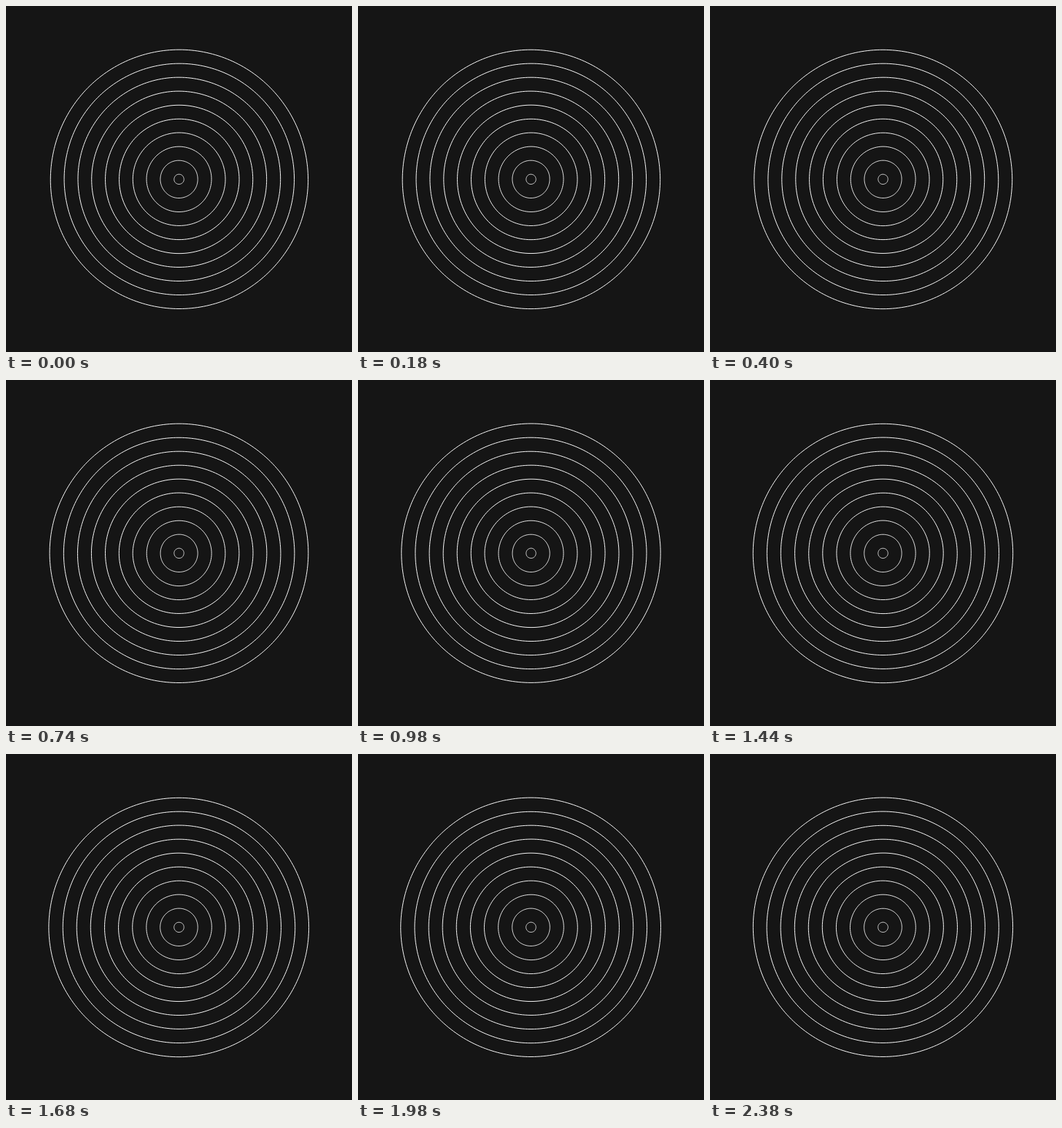
These frames come from a looping animation (500x500 px, 2400 ms). An HTML page with a canvas:

```html
<!DOCTYPE html>
<html lang="en">
<head>
<meta charset="utf-8">
<title>Rings</title>
<style>
  html, body { margin: 0; width: 100%; height: 100%; overflow: hidden; background: #151515; }
  canvas { display: block; }
</style>
</head>
<body>
<canvas id="stage" width="500" height="500"></canvas>
<script>
const ctx = document.getElementById('stage').getContext('2d');
const LOOP = 2400, STEP = 20;
const RINGS = 10, GAP = 20, INNER = 7.2;
const CENTER_X = 250, CENTER_Y = 250.35;
const TAU = Math.PI * 2;

// Slow sideways swelling that reaches the outer rings first.
function swell(ring, time) {
  const amount = 0.1 + 1.1 * ring / (RINGS - 1);
  const delay = (RINGS - 1 - ring) * 90;
  return -amount * (0.2 + Math.cos(Math.PI * (time + 150 - delay) / 2000));
}

// Small unevenness of the outline.
function wobble(ring, angle, time) {
  const size = 0.04 + 0.006 * ring;
  return size * (Math.sin(3 * angle + ring * 2.1 + time / 170) +
                 Math.sin(5 * angle - ring * 1.3 - time / 230));
}

function drawRing(ring, time) {
  const radius = INNER + ring * GAP;
  const growth = swell(ring, time);
  const points = 48 + ring * 24;
  ctx.beginPath();
  for (let k = 0; k < points; k++) {
    const angle = k / points * TAU;
    const c = Math.cos(angle);
    const side = c * c * (c < 0 ? 1 : 0.5);
    const r = radius + growth * side + wobble(ring, angle, time);
    ctx.lineTo(CENTER_X + r * c, CENTER_Y + r * Math.sin(angle));
  }
  ctx.closePath();
  ctx.globalAlpha = Math.min(1, 0.8 + ring * 0.05);
  ctx.stroke();
}

function draw(time) {
  ctx.globalAlpha = 1;
  ctx.fillStyle = '#151515';
  ctx.fillRect(0, 0, 500, 500);
  ctx.strokeStyle = '#fff';
  ctx.lineWidth = 1;
  for (let ring = 0; ring < RINGS; ring++) drawRing(ring, time);
}

let start;
function frame(now) {
  start ??= now;
  const time = (now - start) % LOOP;
  draw(Math.floor(time / STEP) * STEP);
  requestAnimationFrame(frame);
}
draw(0);
requestAnimationFrame(frame);
</script>
</body>
</html>
```
